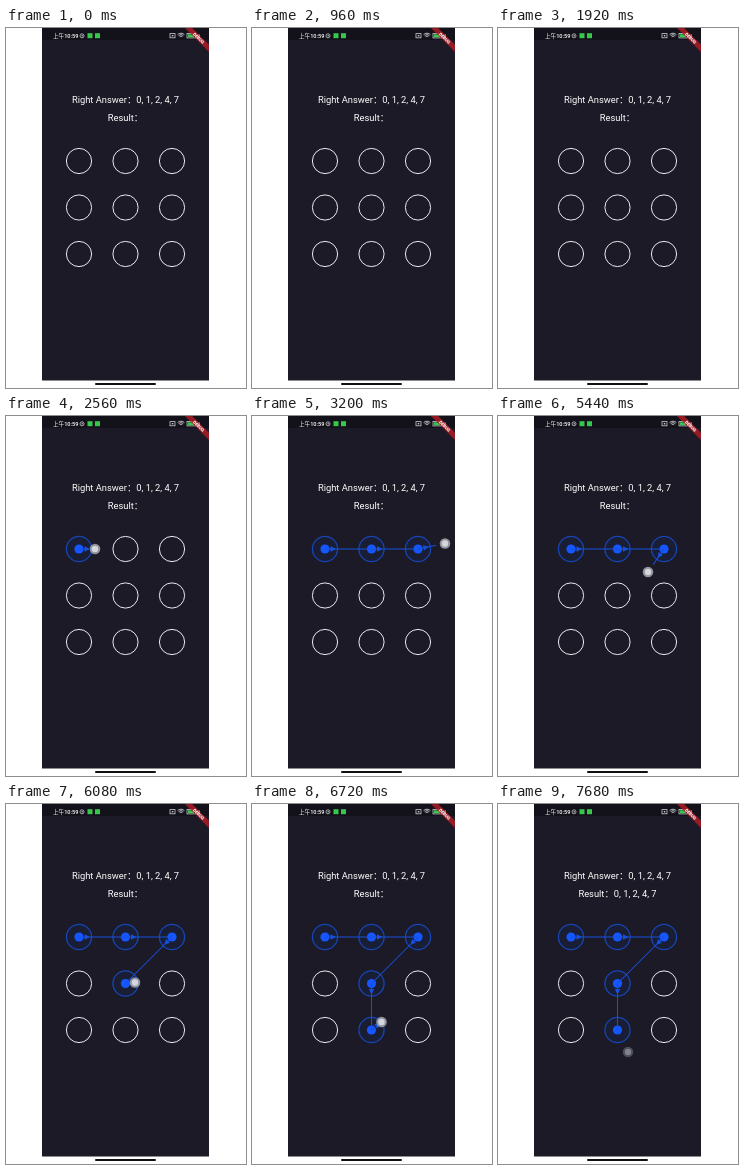
Recreate the animation shown at these times as an HTML page with a canvas. Size 240 px wide and 360 px high, loop 8 s.

```html
<!DOCTYPE html>
<html lang="zh-CN">
<head>
<meta charset="utf-8">
<title>Pattern lock</title>
<style>
html, body { margin: 0; width: 100%; height: 100%; overflow: hidden; background: #fff; }
canvas { display: block; width: 240px; height: 360px; }
</style>
</head>
<body>
<canvas id="stage" width="240" height="360"></canvas>
<script>
const ctx = document.getElementById('stage').getContext('2d');
const LOOP = 8000, STEP = 320;
const FONT = 'Roboto, "Noto Sans CJK SC", "Noto Sans CJK", sans-serif';
const BG = '#1b1a26', BLUE = '#1556ff', LINE = '#1650dc', RING = '#1745b4';
const ANSWER = '0, 1, 2, 4, 7';

const nodes = Array.from({ length: 9 }, (_, i) => ({
  x: 73 + (i % 3) * 46.5,
  y: 133 + Math.floor(i / 3) * 46.5
}));

// Time at which each node joins the pattern: [node, ms]
const picks = [[0, 2560], [1, 2880], [2, 3200], [4, 6080], [7, 6720]];
const TOUCH = 2240, RELEASE = 7680;

// Finger position at each step after the touch
const path = [
  [76.5, 134], [89, 133], [143, 130], [193, 127.5], [192, 128], [186, 129],
  [177, 131], [168, 132.5], [163, 137], [156, 146], [150, 156], [141, 165],
  [129, 178.5], [128, 196], [129.5, 218], [130, 236], [130, 248], [130, 248]
];

function disc(x, y, r, color) {
  ctx.fillStyle = color;
  ctx.beginPath();
  ctx.arc(x, y, r, 0, Math.PI * 2);
  ctx.fill();
}

function ring(x, y, r, color, width) {
  ctx.strokeStyle = color;
  ctx.lineWidth = width;
  ctx.beginPath();
  ctx.arc(x, y, r, 0, Math.PI * 2);
  ctx.stroke();
}

function box(x, y, w, h, color) {
  ctx.fillStyle = color;
  ctx.fillRect(x, y, w, h);
}

function text(str, x, y, size, align = 'center', weight = 400) {
  ctx.font = `${weight} ${size}px ${FONT}`;
  ctx.textAlign = align;
  ctx.fillStyle = '#fff';
  ctx.fillText(str, x, y);
}

function link(from, to, gap = 0) {
  const dx = to.x - from.x, dy = to.y - from.y;
  const length = Math.max(0, Math.hypot(dx, dy) - gap);
  ctx.save();
  ctx.translate(from.x, from.y);
  ctx.rotate(Math.atan2(dy, dx));
  ctx.strokeStyle = LINE;
  ctx.lineWidth = 1;
  ctx.beginPath();
  ctx.moveTo(0, 0);
  ctx.lineTo(length, 0);
  ctx.stroke();
  ctx.fillStyle = LINE;
  ctx.beginPath();
  ctx.moveTo(5.5, -2.7);
  ctx.lineTo(11, 0);
  ctx.lineTo(5.5, 2.7);
  ctx.fill();
  ctx.restore();
}

function statusBar() {
  box(36, 0, 167, 12, '#13121b');
  text('上午10:59', 47, 10, 5.6, 'left', 500);
  ring(76, 7.8, 2, '#c9c9cf', 0.8);
  box(75.5, 7.3, 1.5, 1, '#c9c9cf');
  box(81.5, 5.2, 5, 5, '#35c84b');
  box(89, 5.2, 5, 5, '#35c84b');

  ctx.strokeStyle = '#c9c9cf';
  ctx.lineWidth = 0.8;
  ctx.strokeRect(164, 5.6, 5, 4.2);
  box(165.8, 7, 1.5, 1.4, '#c9c9cf');
  ctx.lineWidth = 0.9;
  for (const r of [1.8, 3.3, 4.8]) {
    ctx.beginPath();
    ctx.arc(175, 10, r, -Math.PI * 0.75, -Math.PI * 0.25);
    ctx.stroke();
  }
  ctx.lineWidth = 0.8;
  ctx.strokeRect(181, 5.5, 9, 4.4);
  box(182, 6.3, 6, 2.8, '#35c84b');
  box(191, 6.6, 3, 2.2, '#c9c9cf');
}

function ribbon() {
  ctx.save();
  ctx.beginPath();
  ctx.rect(36, 0, 167, 352);
  ctx.clip();
  ctx.translate(203, 0);
  ctx.rotate(Math.PI / 4);
  box(-17, 11.9, 34, 5.1, 'rgba(183,28,38,0.8)');
  text('DEBUG', 0, 16, 4.3, 'center', 900);
  ctx.restore();
}

function finger(p, down) {
  ctx.globalAlpha = down ? 1 : 0.42;
  disc(p.x, p.y, 5.3, 'rgba(165,168,178,0.85)');
  disc(p.x, p.y, 3.2, 'rgba(225,226,232,0.85)');
  ctx.globalAlpha = 1;
}

function draw(t) {
  box(0, 0, 240, 360, '#fff');
  box(36, 0, 167, 352.5, BG);
  statusBar();
  ctx.fillStyle = '#111';
  ctx.beginPath();
  ctx.roundRect(89, 355, 61, 2, 1);
  ctx.fill();

  text('Right Answer：' + ANSWER, 119.5, 75, 9.35);
  text('Result：' + (t >= RELEASE ? ANSWER : ''), 119.5, 93, 9.35);

  const chosen = picks.filter(p => t >= p[1]).map(p => p[0]);
  nodes.forEach((n, i) => {
    if (chosen.includes(i)) {
      disc(n.x, n.y, 12.6, 'rgba(21,86,255,0.07)');
      ring(n.x, n.y, 12.6, RING, 1.3);
      disc(n.x, n.y, 4.6, BLUE);
    } else {
      ring(n.x, n.y, 12.6, '#e9e9ee', 1);
    }
  });
  for (let i = 1; i < chosen.length; i++) link(nodes[chosen[i - 1]], nodes[chosen[i]]);

  if (t >= TOUCH) {
    const [x, y] = path[Math.min(path.length - 1, Math.floor((t - TOUCH) / STEP))];
    const p = { x, y }, down = t < RELEASE;
    if (down && chosen.length) link(nodes[chosen[chosen.length - 1]], p, 9);
    finger(p, down);
  }
  ribbon();
}

function tick() {
  const t = performance.now() % LOOP;
  draw(Math.floor(t / STEP) * STEP);
  requestAnimationFrame(tick);
}
tick();
</script>
</body>
</html>
```
